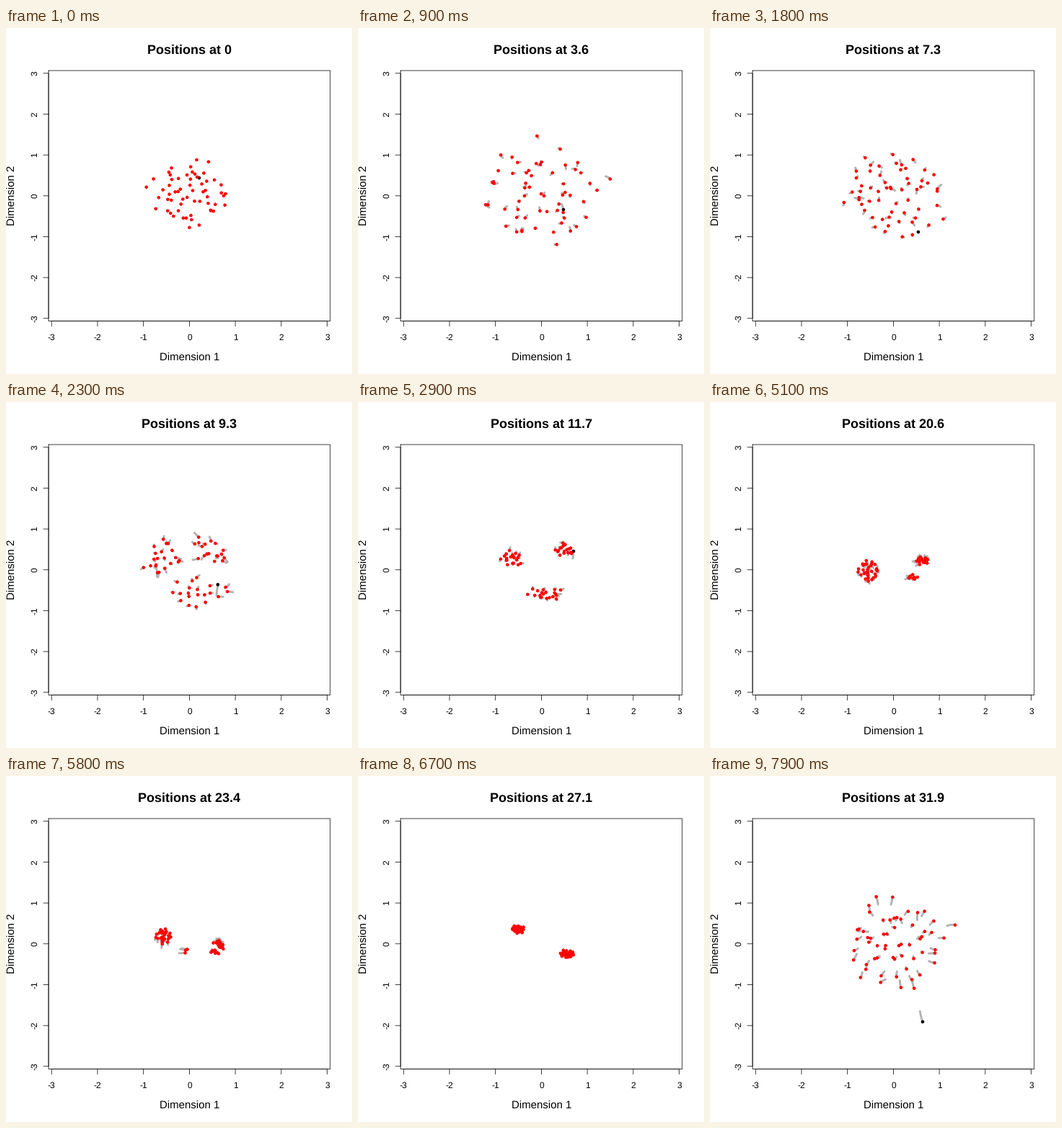
Recreate the animation shown at these times as a matplotlib script. Size 480x480 px, loop 8000 ms.

```python
import numpy as np
import matplotlib.pyplot as plt
from matplotlib.animation import FuncAnimation
from matplotlib.collections import LineCollection

SIZE, DPI = 480, 72
FRAMES, INTERVAL = 80, 100
TIME_STEP = 40 / 99
DOTS = 59
TRAIL = 1.8  # frames of history behind each dot
CENTER = np.array([254.4, 232.8])
SCALE = np.array([63.72, 56.67])

plt.rcParams["font.family"] = "Liberation Sans"
plt.rcParams["text.hinting"] = "none"
rng = np.random.default_rng(7)


def blob(n, cx, cy, rx, ry):
    """Loosely filled ellipse."""
    k = np.arange(n) + .5
    r, a = np.sqrt(k / n), k * 2.39996 + rng.uniform(0, 2 * np.pi)
    unit = np.column_stack([r * np.cos(a), r * np.sin(a)])
    return (cx, cy) + (rx, ry) * (unit + rng.normal(0, .14, (n, 2)))


def disc(r):
    return [(DOTS, 255, 231, r, .88 * r)]


# Per pose: frame, black dot, blobs as (count, cx, cy, rx, ry)
POSES = [
    (0, (268, 208), disc(51)),
    (9, (285, 252), disc(75)),
    (18, (289, 283), disc(66)),
    (29, (299, 207), [(21, 214, 217, 13, 12), (18, 287, 205, 12, 9), (20, 262, 267, 25, 8)]),
    (42, (295, 200), [(13, 291, 199, 5, 4), (46, 239, 246, 26, 18)]),
    (51, (301, 219), [(31, 220, 234, 14, 15), (18, 295, 220, 9, 5), (10, 281, 243, 8, 3)]),
    (67, (292, 247), [(28, 222, 213, 9, 6), (31, 291, 247, 10, 5)]),
    (79, (295, 341), disc(67)),
]


def match(src, dst):
    """Reorder dst by pair swaps so the total travel stays short."""
    cost = ((src[:, None] - dst) ** 2).sum(2)
    order = np.arange(len(src))
    for _ in range(12):
        for i in range(len(src)):
            for j in range(i):
                a, b = order[i], order[j]
                if cost[i, b] + cost[j, a] < cost[i, a] + cost[j, b]:
                    order[i], order[j] = b, a
    return dst[order]


times, keys, wobble = [], [], []
for when, dark, blobs in POSES:
    reds = np.vstack([blob(*b) for b in blobs])
    if keys:
        reds = match(keys[-1][1:], reds)
    keys.append(np.vstack([dark, reds]))
    times.append(float(when))
    wobble.append(min(4, .1 * blobs[0][3]))

path = np.array(keys)
slopes = np.gradient(path, times, axis=0)
slopes[-2] *= .15  # the tight clusters almost rest
slopes[-1] = .065 * (path[-1] - CENTER)  # then burst outwards

heading = rng.uniform(0, 2 * np.pi, DOTS + 1)
drift = np.column_stack([np.cos(heading), np.sin(heading)])
drift[0] = 0
rate = rng.uniform(.35, .75, DOTS + 1)


def positions(t):
    t = max(t, 0)
    i = min(np.searchsorted(times, t, side="right") - 1, len(times) - 2)
    h = times[i + 1] - times[i]
    u = (t - times[i]) / h
    v = 1 - u
    p = (v * v * (1 + 2 * u) * path[i] + u * u * (3 - 2 * u) * path[i + 1]
         + h * u * v * (v * slopes[i] - u * slopes[i + 1]))
    amp = np.interp(t, times, wobble)
    return p + amp * np.sin(rate * t)[:, None] * drift


fig = plt.figure(figsize=(SIZE / DPI, SIZE / DPI), dpi=DPI, facecolor="white")
ax = fig.add_axes([0, 0, 1, 1])
ax.set(xlim=(0, SIZE), ylim=(SIZE, 0))
ax.axis("off")


def line(xs, ys):
    ax.plot(xs, ys, color="black", lw=.75, solid_capstyle="round", snap=False)


def label(x, y, s, size, angle=0, weight="normal"):
    return ax.text(x, y, s, fontsize=size, weight=weight, rotation=angle,
                   rotation_mode="anchor", ha="center", va="baseline")


L, R, T, B = 59.04, 449.76, 59.04, 406.56
line([L, R, R, L, L], [T, T, B, B, T])
cx, cy = CENTER
(x0, y0), (x1, y1) = CENTER - 3 * SCALE, CENTER + 3 * SCALE
line([x0, x1], [B, B])
line([L, L], [y0, y1])
for v in range(-3, 4):
    x, y = CENTER + SCALE * (v, -v)
    line([x, x], [B, B + 7.2])
    line([L - 7.2, L], [y, y])
    label(x, 433, str(v), 12)
    label(43.5, y, str(v), 12, 90)
label(cx, 462.3, "Dimension 1", 15)
label(13.3, cy, "Dimension 2", 15, 90)
title = label(cx, 36, "", 18, weight="bold")

trails = LineCollection([], colors="#b4b4b4", linewidths=3, capstyle="round", zorder=3)
ax.add_collection(trails)
dots = ax.scatter([], [], s=4.6 ** 2, linewidths=0, zorder=4)
dots.set_facecolor(["black"] + ["red"] * DOTS)


def draw(n):
    past = [positions(n - TRAIL * k / 5) for k in range(6)]
    trails.set_segments(list(np.stack(past, axis=1)) if n else [])
    dots.set_offsets(past[0])
    title.set_text(f"Positions at {round(n * TIME_STEP, 1):g}")
    return trails, dots, title


anim = FuncAnimation(fig, draw, frames=FRAMES, interval=INTERVAL,
                     repeat=True, repeat_delay=0, blit=False)
plt.show()
```
